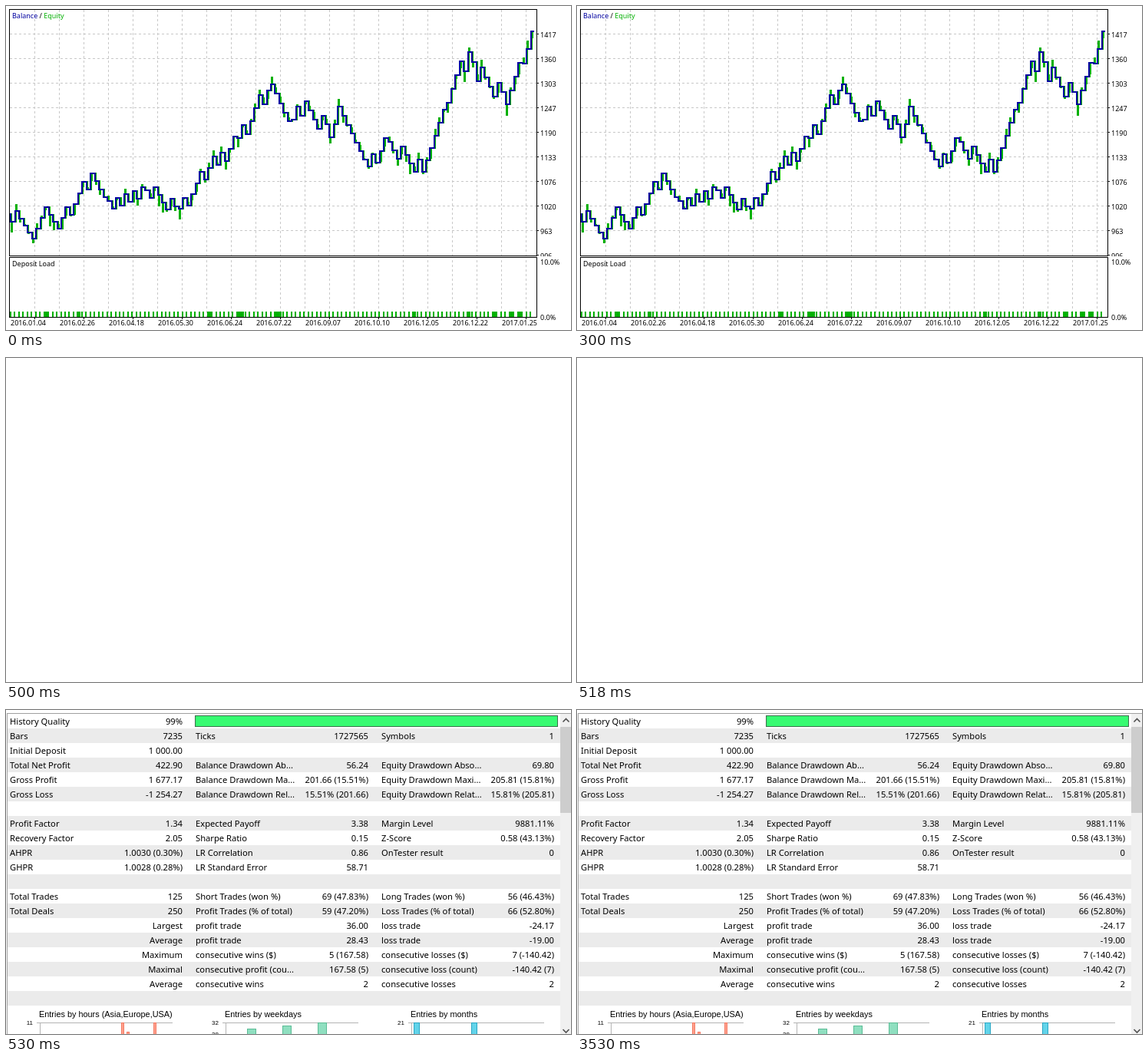
These frames come from a looping animation (736x422 px, 5.53 s). An HTML page:

```html
<!DOCTYPE html>
<html lang="en">
<head>
<meta charset="utf-8">
<title>Test report</title>
<style>
  html, body { margin: 0; width: 100%; height: 100%; overflow: hidden; background: #fff; }
  svg { display: block; }
  text { white-space: pre; }
  #chart { font: 9px "Noto Sans", sans-serif; }
  #table { font: 11.2px "Noto Sans", sans-serif; }
  .title { font: 10.9px "Liberation Sans", Arial, sans-serif; }
  .tick { font: 8px "Liberation Sans", Arial, sans-serif; }
</style>
</head>
<body>
<svg width="736" height="422" viewBox="0 0 736 422">
  <clipPath id="upper"><rect width="736" height="326"/></clipPath>
  <g id="chart"></g>
  <g id="table"></g>
</svg>
<script>
const chart = document.getElementById('chart');
const table = document.getElementById('table');

function add(parent, tag, attrs, text) {
  const el = document.createElementNS('http://www.w3.org/2000/svg', tag);
  for (const name in attrs) el.setAttribute(name, attrs[name]);
  if (text !== undefined) el.textContent = text;
  parent.append(el);
  return el;
}
const rect = (g, x, y, width, height, fill) => add(g, 'rect', { x, y, width, height, fill });
const label = (g, x, y, text, attrs) => add(g, 'text', { x, y, ...attrs }, text);
const path = (g, d, stroke, attrs) => add(g, 'path',
  { d, stroke, fill: 'none', 'shape-rendering': 'crispEdges', ...attrs });

const NAVY = '#0000a0', GREEN = '#00b000';
const TRADES = 125, STEP = 5.46;

// Main turns of the balance: [trade, y]
const turns = [
  [0, 271], [2, 267], [6, 303], [9, 262], [12, 290], [20, 218], [24, 254], [33, 240],
  [41, 264], [45, 231], [55, 172], [63, 102], [68, 148], [71, 124], [77, 171], [79, 131],
  [86, 209], [91, 177], [99, 216], [105, 126], [110, 60], [112, 98], [113, 80],
  [119, 128], [123, 75], [125, 33]
];

function random(seed) {
  const v = Math.sin(seed * 12.9898) * 43758.5453;
  return v - Math.floor(v);
}

// Each trade wins 2.5% or loses 1.7%, whichever stays nearer to the line between turns
function tradeHeights() {
  const toMoney = y => 1000 + (271.7 - y) * 1.78;
  const toY = money => 271.7 - (money - 1000) / 1.78;
  const heights = [turns[0][1]];
  for (let i = 1; i < turns.length; i++) {
    const [k0, y0] = turns[i - 1], [k1, y1] = turns[i];
    let y = y0;
    for (let k = k0 + 1; k < k1; k++) {
      const aim = y0 + (y1 - y0) * (k - k0) / (k1 - k0);
      const win = toY(toMoney(y) * 1.025), loss = toY(toMoney(y) * 0.983);
      y = Math.abs(win - aim) < Math.abs(loss - aim) ? win : loss;
      heights.push(Math.round(y));
    }
    heights.push(y1);
  }
  return heights;
}

function drawCurves() {
  let blue = 'M5 271', green = blue;
  tradeHeights().forEach((y, k) => {
    if (!k) return;
    const x = Math.round(1 + STEP * k);
    const swing = Math.round((random(k) - 0.4) * 24);
    blue += `H${x}V${y}`;
    green += `H${x + 1}V${y + swing}H${x + 2}V${y}`;
  });
  path(chart, green + 'H688', GREEN, { 'stroke-width': 2 });
  path(chart, blue + 'H688', NAVY, { 'stroke-width': 2 });
}

function drawChart() {
  let grid = '';
  for (let y = 36; y < 320; y += 32) grid += `M5 ${y}.5H691`;
  for (let x = 37; x < 690; x += 32) grid += `M${x}.5 5V325M${x}.5 331V405`;
  path(chart, grid, '#c8c8c8', { 'stroke-dasharray': '3 3' });

  drawCurves();
  for (let k = 0; k < TRADES; k++) {
    const wide = random(k + 200) > 0.9;
    rect(chart, Math.round(5 + STEP * k), 398, wide ? 5 : 2, 7, GREEN);
  }
  path(chart, 'M4.5 4.5H691.5V325.5H4.5ZM4.5 327.5H691.5V405.5H4.5Z', '#000');

  const legend = label(chart, 8, 16, '');
  add(legend, 'tspan', { fill: NAVY }, 'Balance');
  add(legend, 'tspan', { fill: '#000' }, ' / ');
  add(legend, 'tspan', { fill: GREEN }, 'Equity');
  label(chart, 8, 339, 'Deposit Load');

  const scale = add(chart, 'g', { 'clip-path': 'url(#upper)' });
  for (let i = 0; i < 10; i++) {
    label(scale, 696, 41 + 32 * i, Math.round(1416.8 - 56.75 * i));
    path(scale, `M691 ${36 + 32 * i}.5h3`, '#000');
  }
  label(chart, 696, 337, '10.0%');
  label(chart, 696, 409, '0.0%');
  ['2016.01.04', '2016.02.26', '2016.04.18', '2016.05.30', '2016.06.24', '2016.07.22',
   '2016.09.07', '2016.10.10', '2016.12.05', '2016.12.22', '2017.01.25'].forEach((date, i) => {
    label(chart, 6 + 64 * i, 416, date);
    path(chart, `M${37 + 64 * i}.5 405v3`, '#000');
  });
}

const rows = [
  'History Quality|99%',
  'Bars|7235|Ticks|1727565|Symbols|1',
  'Initial Deposit|1 000.00',
  'Total Net Profit|422.90|Balance Drawdown Ab...|56.24|Equity Drawdown Abso...|69.80',
  'Gross Profit|1 677.17|Balance Drawdown Ma...|201.66 (15.51%)|Equity Drawdown Maxi...|205.81 (15.81%)',
  'Gross Loss|-1 254.27|Balance Drawdown Rel...|15.51% (201.66)|Equity Drawdown Relat...|15.81% (205.81)',
  '',
  'Profit Factor|1.34|Expected Payoff|3.38|Margin Level|9881.11%',
  'Recovery Factor|2.05|Sharpe Ratio|0.15|Z-Score|0.58 (43.13%)',
  'AHPR|1.0030 (0.30%)|LR Correlation|0.86|OnTester result|0',
  'GHPR|1.0028 (0.28%)|LR Standard Error|58.71',
  '',
  'Total Trades|125|Short Trades (won %)|69 (47.83%)|Long Trades (won %)|56 (46.43%)',
  'Total Deals|250|Profit Trades (% of total)|59 (47.20%)|Loss Trades (% of total)|66 (52.80%)',
  '|Largest|profit trade|36.00|loss trade|-24.17',
  '|Average|profit trade|28.43|loss trade|-19.00',
  '|Maximum|consecutive wins ($)|5 (167.58)|consecutive losses ($)|7 (-140.42)',
  '|Maximal|consecutive profit (cou...|167.58 (5)|consecutive loss (count)|-140.42 (7)',
  '|Average|consecutive wins|2|consecutive losses|2',
  ''
];

// Bars are [x, top]
function histogram(x, title, ticks, bars, width, fill, stroke) {
  label(table, x, 400, title, { class: 'title' });
  ticks.forEach((value, i) =>
    label(table, x - 8, 410 + 15 * i, value, { class: 'tick', 'text-anchor': 'end' }));
  path(table, `M${x - 3} 407.5H${x + 174}M${x + 1.5} 407V422`, '#b4b4b4');
  for (const [left, top] of bars) {
    add(table, 'rect', { x: left + 0.5, y: top + 0.5, width, height: 30, fill, stroke });
  }
}

function drawTable() {
  rows.forEach((row, i) => {
    const y = 19 * i;
    if (i % 2) rect(table, 2, y + 5, 720, 19, '#ebebeb');
    row.split('|').forEach((cell, c) => {
      const left = 5 + 242 * (c >> 1);
      if (c % 2) label(table, left + 225, y + 19, cell, { 'text-anchor': 'end' });
      else label(table, left, y + 19, cell);
    });
  });
  add(table, 'rect', { x: 246.5, y: 7.5, width: 472, height: 14, fill: '#37fb71', stroke: '#3c6e4c' });

  histogram(43, 'Entries by hours (Asia,Europe,USA)', [11],
    [[150, 407], [157, 419], [192, 407]], 3, '#ffa08c', '#f47a64');
  histogram(285, 'Entries by weekdays', [32, 28],
    [[314, 415], [360, 411], [406, 407]], 11, '#8fdfc0', '#5cbc96');
  histogram(527, 'Entries by months', [21],
    [[531, 407], [606, 407]], 7, '#62d4ea', '#2ba6c4');

  rect(table, 722, 5, 14, 417, '#f0f0f0');
  rect(table, 722, 22, 14, 112, '#cdcdcd');
  path(table, 'M725.5 15.5l4 -4l4 4M725.5 416l4 4l4 -4', '#505050',
    { 'stroke-width': 1.6, 'shape-rendering': 'auto' });
  path(table, 'M1 4.5H736M1.5 4V422', '#a0a0a0');
}

function tick() {
  const t = performance.now() % 5530;
  chart.style.display = t < 500 ? '' : 'none';
  table.style.display = t >= 530 ? '' : 'none';
  requestAnimationFrame(tick);
}

drawChart();
drawTable();
tick();
</script>
</body>
</html>
```
